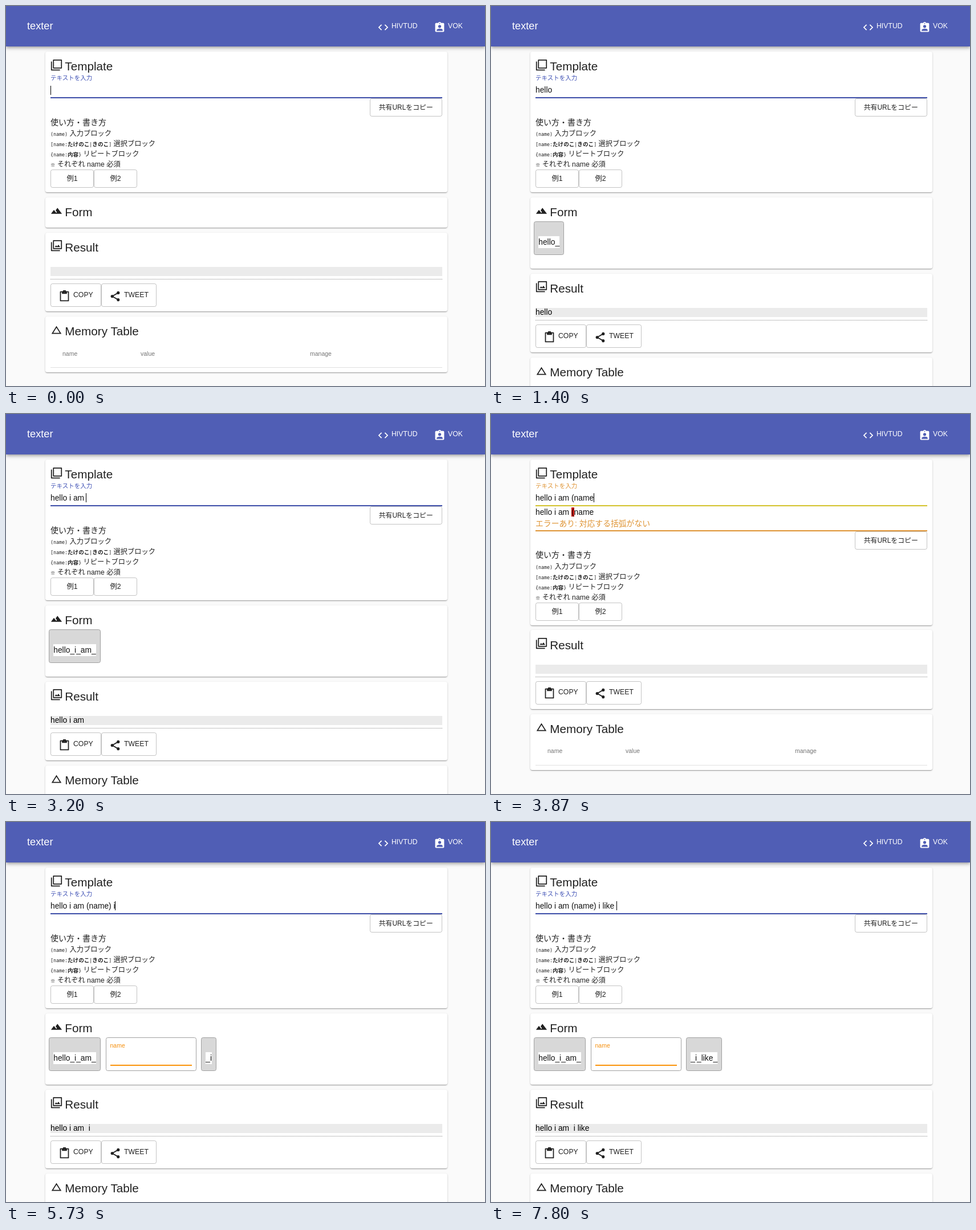
Recreate the animation shown at these times as an HTML page. Size 840 px wide and 667 px high, loop 8 s.

```html
<!DOCTYPE html>
<html lang="ja">
<head>
<meta charset="utf-8">
<title>texter</title>
<style>
  html, body { margin: 0; width: 100%; height: 100%; overflow: hidden; background: #fafafa; }
  body { font-family: "Liberation Sans", "Noto Sans CJK JP", "Noto Sans CJK", sans-serif; color: #212121; }
  #stage { position: relative; width: 840px; height: 667px; overflow: hidden; --accent: #3f51b5; --rule: #3c4da8; }
  #stage.error { --accent: #df9434; --rule: #d3c22c; }

  /* cap height is centred 10px below the top of each text */
  .t { position: absolute; line-height: 20px; white-space: pre; }
  .icon { position: absolute; width: 21px; height: 21px; fill: currentColor; }
  .line { fill: none; stroke: currentColor; stroke-width: 2; }
  .hole { fill: #505eb5; }

  header { position: absolute; inset: 0 0 auto; height: 70.5px; background: #505eb5; color: #fff; z-index: 1;
    box-shadow: 0 2px 4px -1px #0003, 0 4px 5px #00000024, 0 1px 10px #0000001f; }
  header .t, .button { font-size: 12.25px; }
  header .title { font-size: 18.2px; }

  main { position: absolute; left: 69px; top: 80px; width: 704.5px; }
  .card { position: relative; margin-bottom: 8.75px; background: #fff; border-radius: 3.5px;
    box-shadow: 0 1px 3px #0003, 0 1px 1px #00000024, 0 2px 1px -1px #0000001f; }
  .card > .icon { left: 9px; top: 12.9px; }
  h2 { margin: 0; left: 34.3px; top: 16.3px; font-size: 20.7px; font-weight: 400; }
  .button { position: absolute; box-sizing: border-box; height: 32px; line-height: 30px; text-align: center;
    border: 1px solid #0000003b; border-radius: 3.5px; }
  .text { left: 9px; font-size: 13.82px; color: #111; }
  .rule { position: absolute; left: 9px; width: 686.5px; height: 2px; }

  #template { height: 247px; }
  .error #template { height: 290.5px; }
  .label { left: 9px; top: 36px; font-size: 10.5px; color: var(--accent); }
  #caret { position: absolute; top: 2px; margin-left: -.5px; width: 1px; height: 16px; background: #000; }
  .empty #caret { top: 3px; }
  .problem { display: none; }
  .error .problem { display: block; }
  mark { background: #c9150f; color: #200; }
  #guide { position: absolute; left: 9px; top: 82px; width: 686.5px; font-size: 12.25px; }
  .error #guide { top: 125.5px; }
  .share { right: 0; width: 126.5px; font-size: 11.9px; }
  code { font: 8.3px "DejaVu Sans Mono", "Noto Sans CJK JP", monospace; line-height: 1; }
  code b { font-size: 9.6px; font-family: "Noto Sans CJK JP", "Noto Sans CJK", sans-serif; }
  small { font-size: 8.3px; font-weight: 700; }

  #form { height: 53px; }
  .filled #form { height: 125px; }
  .error #form { display: none; }
  #blocks { position: absolute; left: 6.25px; top: 42.5px; display: flex; gap: 8.75px; }
  .block { position: relative; box-sizing: border-box; height: 58.5px; padding: 24.75px 7px 0;
    border: 1px solid #a0a0a0; border-radius: 3.5px; background: #d8d8d8; font-size: 13.82px; color: #111; }
  .block span { display: block; height: 20.5px; line-height: 20px; background: #fff; white-space: pre; }
  .field { width: 159px; background: #fff; }
  .field .t { left: 7px; top: 3px; font-size: 10.5px; color: #f58f0c; }
  .field::after { content: ""; position: absolute; left: 7px; right: 6.5px; top: 46.75px; height: 2px; background: #fb940b; }

  #result { height: 138.5px; }
  .bar { top: 60.5px; height: 16px; background: #ebebeb; }
  .dots { top: 81.5px; height: 0; border-top: 1px dotted #888; }
  .action { top: 89.5px; height: 41px; }
  #memory { height: 98.5px; }
  .column { top: 54.8px; font-size: 10.5px; color: #757575; }
</style>
</head>
<body>
<div id="stage">
  <header>
    <div class="t title" style="left:37px;top:25px">texter</div>
    <svg class="icon" style="left:651px;top:26.5px" viewBox="0 0 24 24"><path class="line" d="M8.7 6.7 3.4 12l5.3 5.3M15.3 6.7l5.3 5.3-5.3 5.3"/></svg>
    <div class="t" style="left:676px;top:25px">HIVTUD</div>
    <svg class="icon" style="left:749.6px;top:26.5px" viewBox="0 0 24 24">
      <rect x="3" y="3" width="18" height="18" rx="2"/><circle cx="12" cy="4" r="3"/>
      <g class="hole"><circle cx="12" cy="4" r="1"/><circle cx="12" cy="10" r="3"/><path d="M6 19v-1.4c0-4.1 12-4.1 12 0V19z"/></g>
    </svg>
    <div class="t" style="left:775px;top:25px">VOK</div>
  </header>

  <main>
    <section class="card" id="template">
      <svg class="icon" viewBox="0 0 24 24"><path class="line" stroke-linejoin="round" d="M2 5v17h17M6 2h16v16H6z"/></svg>
      <h2 class="t">Template</h2>
      <div class="t label">テキストを入力</div>
      <div class="t text" style="top:57px"><span id="typed"></span><i id="caret"></i></div>
      <div class="rule" style="top:80px;background:var(--rule)"></div>
      <div class="problem">
        <div class="t text" style="top:82px">hello i am <mark>(</mark><span id="rest"></span></div>
        <div class="t text" style="top:102px;color:var(--accent)">エラーあり: 対応する括弧がない</div>
        <div class="rule" style="top:124px;background:var(--accent)"></div>
      </div>
      <div id="guide">
        <div class="button share">共有URLをコピー</div>
        <div class="t" style="top:31.5px;font-size:14px">使い方・書き方</div>
        <div class="t" style="top:52px"><code>(name)</code> 入力ブロック</div>
        <div class="t" style="top:70px"><code>[name:<b>たけのこ</b>|<b>きのこ</b>]</code> 選択ブロック</div>
        <div class="t" style="top:88px"><code>{name:<b>内容</b>}</code> リピートブロック</div>
        <div class="t" style="top:106px"><small>※</small> それぞれ name 必須</div>
        <div class="button" style="top:125px;width:76px">例1</div>
        <div class="button" style="left:76px;top:125px;width:76px">例2</div>
      </div>
    </section>

    <section class="card" id="form">
      <svg class="icon" viewBox="0 0 24 24"><path d="M14 6l-3.75 5 2.85 3.8-1.6 1.2C9.8 13.75 7 10 7 10l-6 8h22z"/></svg>
      <h2 class="t">Form</h2>
      <div id="blocks"></div>
    </section>

    <section class="card" id="result">
      <svg class="icon" viewBox="0 0 24 24"><path class="line" stroke-linejoin="round" d="M2 5v17h17M6 2h16v16H6z"/><path d="M8.5 15h11L16 10.3l-2.8 3.5-2-2.3z"/></svg>
      <h2 class="t">Result</h2>
      <div class="rule bar"></div>
      <div class="t text" id="output" style="top:57.5px;color:#000"></div>
      <div class="rule dots"></div>
      <div class="button action" style="left:9px;width:89px">
        <svg class="icon" style="left:13.4px;top:10.5px" viewBox="0 0 24 24">
          <path class="line" stroke-linejoin="round" d="M4 3h16v18H4z"/>
          <path fill-rule="evenodd" d="M7 2h2a3 3 0 0 1 6 0h2v5H7zM11 3a1 1 0 0 0 2 0 1 1 0 0 0-2 0z"/>
        </svg>
        <div class="t" style="left:39px;top:8.5px">COPY</div>
      </div>
      <div class="button action" style="left:98px;width:97px">
        <svg class="icon" style="left:13.4px;top:10.5px" viewBox="0 0 24 24">
          <path class="line" d="M18 5 6 12l12 7"/>
          <circle cx="18" cy="5" r="3"/><circle cx="6" cy="12" r="3"/><circle cx="18" cy="19" r="2.9"/>
        </svg>
        <div class="t" style="left:39px;top:8.5px">TWEET</div>
      </div>
    </section>

    <section class="card" id="memory">
      <svg class="icon" viewBox="0 0 24 24"><path fill-rule="evenodd" d="M12 7.8 18.4 18H5.6zM12 4 2 20h20z"/></svg>
      <h2 class="t">Memory Table</h2>
      <div class="t column" style="left:30px">name</div>
      <div class="t column" style="left:167px">value</div>
      <div class="t column" style="left:464px">manage</div>
      <div class="rule" style="top:89.3px;height:1px;background:#e0e0e0"></div>
    </section>
  </main>
</div>

<script>
const LOOP = 8000;
const SCRIPT = "hello i am (name) i like ";
const KEYS = [330, 400, 470, 670, 800, 870, 1600, 1800, 2000, 2130, 2200, 3400, 3530,
  3670, 3730, 3870, 4070, 4200, 5730, 5870, 6730, 6800, 7000, 7200, 7800];
const LATE = { count: 24, until: 7670 }; // the result catches up late with this key
const FIELD = "(name)";
const $ = id => document.getElementById(id);
let shown = "";

function block(text) {
  return text && `<div class="block"><span>${text.replaceAll(" ", "_")}</span></div>`;
}

function render(count, resultCount) {
  const text = SCRIPT.slice(0, count);
  const [before, after] = text.split(FIELD);
  const error = text.includes("(") && after === undefined;
  $("stage").className = error ? "error" : text ? "filled" : "empty";
  $("typed").textContent = text;
  $("rest").textContent = text.split("(")[1] || "";
  const field = '<div class="block field"><div class="t">name</div></div>';
  $("blocks").innerHTML = error ? "" : block(before) + (after === undefined ? "" : field + block(after));
  $("output").textContent = error ? "" : SCRIPT.slice(0, resultCount).replace(FIELD, "");
}

function tick(now) {
  const t = now % LOOP;
  const count = KEYS.filter(key => key <= t).length;
  const resultCount = count === LATE.count && t < LATE.until ? count - 1 : count;
  const state = count + "/" + resultCount;
  if (state !== shown) render(count, resultCount);
  shown = state;
  const idle = t - (KEYS[count - 1] || 0);
  $("caret").style.visibility = idle % 1000 < 530 ? "visible" : "hidden";
  requestAnimationFrame(tick);
}

render(0, 0);
requestAnimationFrame(tick);
</script>
</body>
</html>
```
